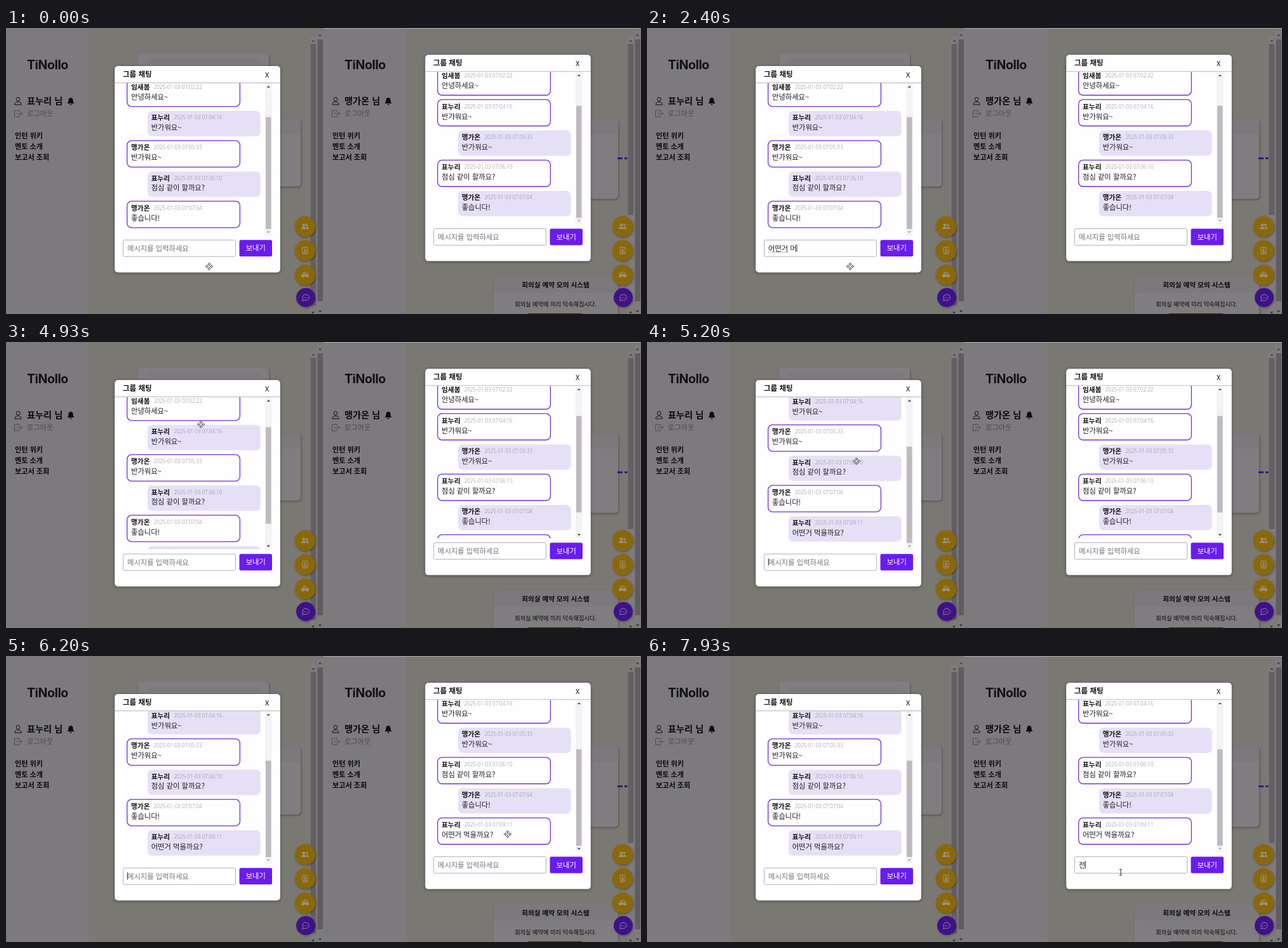
An HTML page for the animation above (8000 ms loop, 1000x451 px).

```html
<!DOCTYPE html>
<html lang="ko">
<head>
<meta charset="utf-8">
<style>
html, body { margin: 0; width: 100%; height: 100%; overflow: hidden; background: #7a7872; }
svg { display: block; width: 1000px; height: 451px; }
text { font-family: "Noto Sans CJK KR", "Noto Sans CJK", "Noto Sans", sans-serif; white-space: pre; }
filter { color-interpolation-filters: sRGB; }
.b { font-weight: 700; }
.logo { font-family: Inter, sans-serif; font-weight: 700; letter-spacing: -.4px; }
.time { font-family: "Open Sans", sans-serif; font-weight: 300; }
.mid { text-anchor: middle; }
</style>
</head>
<body>
<svg id="stage" viewBox="0 0 1000 451"></svg>
<script>
const LOOP = 8000, SENT = 4050, RIGHT_FOCUS = 6950;
const A = '표누리', B = '맹가온', C = '임새봄';
const HINT = '메시지를 입력하세요';
const CHAT = [
  [C, '02:22', '안녕하세요~'], [A, '04:16', '반가워요~'], [B, '05:33', '반가워요~'],
  [A, '06:10', '점심 같이 할까요?'], [B, '07:04', '좋습니다!'], [A, '09:11', '어떤거 먹을까요?']
];
const TYPED = [
  [[500, 'ㅇ'], [700, '어'], [950, '어ㄸ'], [1150, '어떠'], [1400, '어떤'], [1700, '어떤ㄱ'],
   [1880, '어떤거'], [2080, '어떤거 '], [2260, '어떤거 ㅁ'], [2400, '어떤거 머'], [2530, '어떤거 먹'],
   [2670, '어떤거 먹ㅇ'], [2790, '어떤거 먹으'], [2900, '어떤거 먹을'], [3060, '어떤거 먹을ㄲ'],
   [3180, '어떤거 먹을까'], [3320, '어떤거 먹을깡'], [3450, '어떤거 먹을까요'], [3750, '어떤거 먹을까요?'], [SENT, '']],
  [[7520, 'ㅈ'], [7720, '저'], [7880, '전']]
];
const PATH = [[0, 320, 376], [4350, 320, 376], [4930, 307, 130], [5200, 330, 188],
  [5500, 430, 225], [6070, 785, 280], [6200, 790, 281], [6500, 790, 281], [6950, 746, 341], [LOOP, 746, 341]];
const SCROLL = [[5030, 5150, 47], [5950, 6100, 48.5]];

const text = (x, y, s, size, fill = '#111', cls = '') =>
  `<text x="${x}" y="${y + size * .38}" font-size="${size}" fill="${fill}" class="${cls}">${s}</text>`;
const rect = (x, y, w, h, fill, r = 0, more = '') =>
  `<rect x="${x}" y="${y}" width="${w}" height="${h}" rx="${r}" fill="${fill}" ${more}/>`;
const path = (d, stroke, w = 1, fill = 'none', more = '') =>
  `<path d="${d}" stroke="${stroke}" stroke-width="${w}" fill="${fill}" ${more}/>`;
const arrow = (x, y, dir, fill, id = '') =>
  `<path ${id && `id="${id}"`} d="M${x - 2.7} ${y + 1.4 * dir}h5.4l-2.7 ${-2.8 * dir}z" fill="${fill}"/>`;
const fab = (x, y, fill, r, icon) =>
  `<g transform="translate(${x} ${y})"><circle r="${r}" fill="${fill}" filter="url(#soft)"/><g transform="scale(.9)">${icon}</g></g>`;

function fabs() {
  const ink = '#979182', gold = '#8a680a';
  const people = `<g fill="${ink}"><circle cx="-2.4" cy="-2.6" r="2.5"/><circle cx="3" cy="-2.6" r="2"/>
    <path d="M-7 4.5q0-4 4.6-4t4.6 4zM3.2 4.5q0-2.4-1.4-3.8 5-.6 5 3.8z"/></g>`;
  const badge = rect(-4.5, -6, 9, 12, 'none', 1.5, `stroke="${ink}" stroke-width="1.2"`) +
    `<circle cy="-1.4" r="1.9" fill="${ink}"/><path d="M-3 4q0-3 3-3t3 3z" fill="${ink}"/>`;
  const desk = path('M-4-1q0-4 4-4t4 4M-1-5v4', ink, 1.3) +
    `<path d="M-6.5-1h13v5h-4q-2.5-3-5 0h-4z" fill="${ink}"/>`;
  const bubble = path('M-5 3.5q-2-4 .5-7 4.5-3.8 9 0 3.6 4.2-.5 7.5-3 2-6 .8l-4 1z', ink) +
    [-2.6, 0, 2.6].map(x => `<circle cx="${x}" cy=".4" r=".8" fill="${ink}"/>`).join('');
  return fab(471, 313, gold, 16.3, people) + fab(471, 351, gold, 16.3, badge) +
    fab(471, 389.5, gold, 16.3, desk) + fab(472, 425, '#3e118a', 15, bubble);
}

function page(right) {
  const card = '#7f7d7f', bar = '#7b797c', soft = 'filter="url(#soft)"';
  let s = rect(0, 0, 500, 451, '#7a7872') + rect(0, 0, 130.5, 451, '#7c7a7d');
  if (right) {
    s += rect(400, 143, 64, 126.5, card, 5, soft) + rect(400, 143, 64, 25, bar, 5) +
      path('M463 205.5h16', '#3e118a', 3, 'none', 'stroke-dasharray="8 3"') +
      rect(268, 391, 196, 70, card, 5, soft) + rect(268, 391, 196, 26, bar, 5) +
      text(365.5, 405, '회의실 예약 모의 시스템', 10.6, '#0a0a0a', 'b mid') +
      text(365.5, 436, '회의실 예약에 미리 익숙해집시다.', 9.2, '#0a0a0a', 'mid') +
      rect(321, 450, 87, 4, '#3e118a', 2);
  } else {
    s += rect(208, 40, 206, 60, card, 5, soft) + rect(224, 48, 179, 8, bar, 3) +
      rect(400, 143, 64, 107, card, 5, soft) + rect(400, 143, 64, 25, bar, 5);
  }
  s += rect(478.5, 13, 10.5, 438, '#7d7b7c') + rect(489.5, 4, 10.5, 447, '#7d7b7c') +
    rect(479.5, 25, 8.5, right ? 270 : 413, '#626064') + rect(490.5, 18, 8.5, 413, '#5f5d61');
  s += arrow(484, 20, 1, '#444') + arrow(494.5, 11, 1, '#444') +
    arrow(483.5, 449, -1, '#333') + arrow(494.5, 447, -1, '#333');
  s += text(33, 58, 'TiNollo', 19.5, '#111014', 'logo') +
    text(33, 115, (right ? B : A) + ' 님', 14.2, '#0a0a0a', 'b') +
    text(33, 135, '로그아웃', 11.2, '#4c4a4d');
  ['인턴 위키', '멘토 소개', '보고서 조회'].forEach((m, i) => s += text(14, 170 + i * 16.8, m, 11.1, '#0a0a0a', 'b'));
  s += `<circle cx="19" cy="112.3" r="2.9" fill="none" stroke="#111"/>` +
    path('M13.8 121q0-4.4 5.2-4.4t5.2 4.4z', '#111') +
    `<path d="M96.5 119q2-2 2-5 0-3.6 3.5-4.2 3.5.6 3.5 4.2 0 3 2 5zM100 120h4q-2 3-4 0z" fill="#0a0a0a"/>` +
    path('M21 132.5v-2.5h-7.5v10h7.5v-2.5M17 135h8.5m-2.5-2.5l2.5 2.5-2.5 2.5', '#4c4a4d');
  if (right) s += rect(0, 0, 500, 1, '#aaa8ab');
  return s + fabs();
}

function messages(i) {
  const me = [A, B][i];
  let y = 82.2, s = '';
  CHAT.forEach(([who, at, said], n) => {
    const own = who === me, x = own ? 223 : 190.7;
    const tx = own ? 228.7 : 197, h = own ? 40 : 41.6, mid = y + (own ? 10.3 : 10.7);
    s += `<g ${n === 5 ? `id="new${i}"` : ''}>` +
      rect(x, y, 177.7, h, own ? '#e6e0f7' : '#fefdff', 7, own ? '' : 'stroke="#7430cf" stroke-width="1.3"') +
      text(tx, mid, who, 10.7, '#111', 'b') +
      text(tx + 35.7, mid, '2025-01-03 07:' + at, 8.1, '#86848b', 'time') +
      text(tx, mid + 15.7, said, 11.3, '#1c1b1e') + '</g>';
    y += h + (own ? 7 : 6.9);
  });
  return s;
}

function modal(i) {
  return `<g transform="translate(${i * 489} ${i * -17.8})">` +
    rect(171.2, 60, 260.6, 325.4, '#fefdff', 5, 'filter="url(#drop)"') +
    text(184, 72.5, '그룹 채팅', 11.5, '#111', 'b') + text(408, 73.7, 'X', 11, '#111') +
    path('M171 86.5h261', '#bbb8bd') +
    `<g clip-path="url(#view)"><g id="list${i}">${messages(i)}</g></g>` +
    rect(408, 87, 10.5, 240, '#f3f2f5') + rect(409, 140, 8.5, 176, '#bdbbbf', 0, `id="thumb${i}"`) +
    arrow(413.3, 92.5, 1, '#555') + arrow(413.3, 322, -1, '#aaa', 'down' + i) +
    rect(184.5, 334.3, 177, 26, '#fefdff', 2, 'stroke="#b5b2bd"') +
    `<text id="field${i}" x="191" y="351.5" font-size="11.3"></text>` +
    path('', '#77758a', 1, 'none', `id="squiggle${i}" stroke-dasharray="1.5 1.5"`) +
    rect(191, 341, .9, 12, '#222', 0, `id="caret${i}"`) +
    rect(367.5, 334.3, 51.5, 26, '#6a1bee', 2.5) + text(393.3, 347.2, '보내기', 11.3, '#fff', 'mid') + '</g>';
}

function moveCursor() {
  const tips = [0, 90, 180, 270].map(a =>
    `<path d="M0-6l2.3 2.6h-4.6z" transform="rotate(${a})"/>`).join('');
  return `<g id="move" fill="#fff" stroke="#5a585e" stroke-width=".9">${tips}
    <path d="M0-2.2L2.2 0 0 2.2-2.2 0zM-3.4 0h1.2M2.2 0h1.2M0-3.4v1.2M0 2.2v1.2"/></g>`;
}

const $ = id => document.getElementById(id);
$('stage').innerHTML = `<defs>
  <clipPath id="view"><rect x="171" y="87" width="237" height="240"/></clipPath>
  <filter id="soft" x="-20%" y="-20%" width="140%" height="150%"><feDropShadow dx="1" dy="1.5" stdDeviation="1.5" flood-opacity=".3"/></filter>
  <filter id="drop"><feDropShadow dx="0" dy="1" stdDeviation="2.5" flood-opacity=".4"/></filter>
  </defs><g>${page(false)}</g><g transform="translate(500 0)">${page(true)}</g>${modal(0)}${modal(1)}${moveCursor()}
  <g id="beam">${path('M-2-4.5h1.5l.5.5.5-.5H2M0-4v8M-2 4.5h1.5l.5-.5.5.5H2', '#222')}</g>`;

const show = (el, on) => el.setAttribute('visibility', on ? 'visible' : 'hidden');
const ease = u => u * u * (3 - 2 * u);
const ramp = (t, a, b) => ease(Math.min(1, Math.max(0, (t - a) / (b - a))));

function pointer(t) {
  const k = PATH.findIndex(p => p[0] > t);
  const [t0, x0, y0] = PATH[k - 1], [t1, x1, y1] = PATH[k];
  const u = ramp(t, t0, t1);
  return [x0 + (x1 - x0) * u, y0 + (y1 - y0) * u];
}

function drawPanel(i, t) {
  const [from, to, dist] = SCROLL[i], sent = t >= SENT, u = ramp(t, from, to);
  show($('new' + i), sent);
  $('list' + i).setAttribute('transform', `translate(0 ${-dist * u})`);
  const thumb = $('thumb' + i);
  thumb.setAttribute('y', sent ? 134.5 + 30.5 * u : 140.5);
  thumb.setAttribute('height', sent ? 152 : 176.5);
  $('down' + i).setAttribute('fill', sent && t < (i ? 6250 : to) ? '#444' : '#aaa');

  const step = TYPED[i].filter(s => s[0] <= t).pop();
  const typed = step ? step[1] : '', field = $('field' + i);
  if (field.textContent !== (typed || HINT)) field.textContent = typed || HINT;
  field.setAttribute('fill', typed ? '#222' : '#77757c');
  const start = i ? RIGHT_FOCUS : SENT;
  const blink = t >= start && (t - start) % 1060 < 530 && (i || t < RIGHT_FOCUS);
  const caret = $('caret' + i);
  show(caret, typed || blink);
  caret.setAttribute('x', 190.8 + (typed ? field.getComputedTextLength() : 0));
  const checked = typed.length > 3;
  $('squiggle' + i).setAttribute('d', checked ? `M191 353.5h${field.getSubStringLength(0, 3)}` : '');
}

function frame() {
  const t = performance.now() % LOOP;
  drawPanel(0, t);
  drawPanel(1, t);
  const [x, y] = pointer(t), inField = x > 673 && x < 850 && y > 317 && y < 343;
  show($('move'), !inField);
  show($('beam'), inField);
  for (const id of ['move', 'beam']) $(id).setAttribute('transform', `translate(${x} ${y})`);
  requestAnimationFrame(frame);
}
frame();
</script>
</body>
</html>
```
